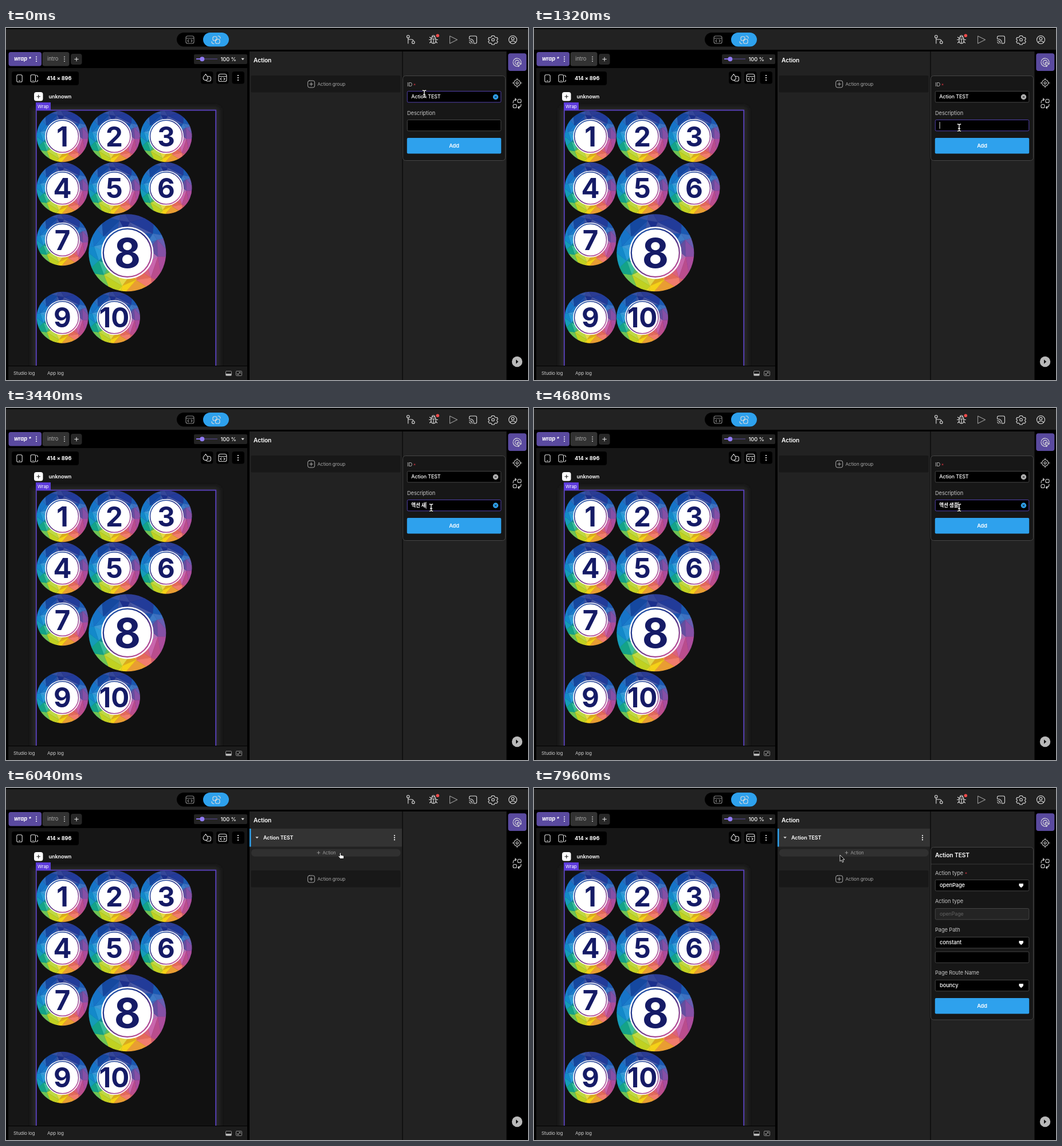
These frames come from a looping animation (911 px wide and 615 px high, 8 s). An HTML page:

```html
<!DOCTYPE html>
<html lang="en">
<head>
<meta charset="utf-8">
<title>Action editor</title>
<style>
html, body { margin: 0; width: 100%; height: 100%; overflow: hidden; background: #000; }
svg { display: block; width: 911px; height: 615px; }
text { font-family: Inter, "Noto Sans CJK KR", "Noto Sans CJK", sans-serif; letter-spacing: -.012em; white-space: pre; }
.i { fill: none; stroke: #ddd; stroke-width: 1.1; stroke-linecap: round; stroke-linejoin: round; }
</style>
</head>
<body>
<svg id="stage" viewBox="0 0 911 615"></svg>
<script>
const BLUE = '#2ea1ed', PURPLE = '#5140a8', EDGE = '#454545';

const text = (x, y, s, size = 9.3, fill = '#fff', weight = 400, more = '') =>
  `<text x="${x}" y="${y}" font-size="${size}" fill="${fill}" font-weight="${weight}" ${more}>${s}</text>`;
const rect = (x, y, w, h, fill, r = 0, more = '') =>
  `<rect x="${x}" y="${y}" width="${w}" height="${h}" rx="${r}" fill="${fill}" ${more}/>`;
const dot = (x, y, r, fill = '#fff', more = '') =>
  `<circle cx="${x}" cy="${y}" r="${r}" fill="${fill}" ${more}/>`;
const icon = (x, y, d, more = '') =>
  `<path class="i" transform="translate(${x} ${y})" d="${d}" ${more}/>`;
const ring = r => `M${-r} 0a${r} ${r} 0 1 0 ${2 * r} 0a${r} ${r} 0 1 0 ${-2 * r} 0`;
const box = (x, y, w, h, r = 2) =>
  `M${x + r} ${y}h${w - 2 * r}q${r} 0 ${r} ${r}v${h - 2 * r}q0 ${r} ${-r} ${r}h${2 * r - w}q${-r} 0 ${-r} ${-r}v${2 * r - h}q0 ${-r} ${r} ${-r}z`;
const kebab = (x, y, g = 4, r = 1.1) => [-g, 0, g].map(d => dot(x, y + d, r)).join('');
const field = (y, id = '', fill = '#000') =>
  rect(700.3, y + .5, 163.5, 19.3, fill, 2, `stroke="${EDGE}" id="${id}"`);
const label = (y, s) => text(700, y, s, 9.3, '#c4c4c4');
const star = (x, y) => text(x, y, '*', 8, '#d8343f');
const addButton = y => rect(699.8, y, 164.4, 27.4, BLUE, 2) +
  text(782, y + 16.7, 'Add', 9.2, '#fff', 600, 'text-anchor="middle"');
const clear = (y, id) => `<g id="${id}">${dot(854.5, y, 4.7, 'currentColor')}` +
  `<path d="M852.8 ${y - 1.7}l3.4 3.4m0 -3.4l-3.4 3.4" stroke="#111"/></g>`;
const select = (y, s) => field(y) + text(708, y + 13.2, s, 9.3, '#fff', 500) +
  `<path d="M846.5 ${y + 7}h7.4v3.2q-1 2.2 -3.7 4q-2.7 -1.8 -3.7 -4z" fill="#fff"/>`;

// Low-poly colour wheel, one stop every 30 degrees clockwise from the right
const WHEEL = ['8e4ba2', 'c4509f', 'f4735a', 'fdd418', 'b4d325', '16b08c',
               '1492d6', '1170c6', '1748a6', '1c2a86', '1b3192', '1b66be']
  .map(h => [0, 2, 4].map(i => parseInt(h.slice(i, i + 2), 16)));
let seed = 11;
const rnd = () => (seed = seed * 16807 % 2147483647) / 2147483647;

function facets() {
  const N = 12, radii = [25, 37, 53];
  const v = radii.map((r, k) => Array.from({ length: N }, (_, i) => {
    const a = (i + k / 2 + (rnd() - .5) * .7) / N * 2 * Math.PI, q = r + (k == 1 ? (rnd() - .5) * 9 : 0);
    return [q * Math.cos(a), q * Math.sin(a)];
  }));
  const tri = (...p) => {
    const cx = p[0][0] + p[1][0] + p[2][0], cy = p[0][1] + p[1][1] + p[2][1];
    const h = (Math.atan2(cy, cx) / Math.PI * 6 + 12) % 12, i = h | 0, f = h - i;
    const lift = (rnd() - .42) * (Math.hypot(cx, cy) < 108 ? .34 : .2);
    const c = WHEEL[i].map((a, k) => {
      const m = a + (WHEEL[(i + 1) % 12][k] - a) * f;
      return Math.round(lift > 0 ? m + (255 - m) * lift : m * (1 + lift));
    });
    return `<path d="M${p.map(q => q.map(n => n.toFixed(1))).join('L')}z" fill="rgb(${c})" stroke="rgb(${c})" stroke-width=".4"/>`;
  };
  let out = '';
  for (let k = 0; k < 2; k++)
    for (let i = 0; i < N; i++) {
      const j = (i + 1) % N;
      out += tri(v[k][i], v[k][j], v[k + 1][i]) + tri(v[k][j], v[k + 1][i], v[k + 1][j]);
    }
  return out;
}

const ball = (n, x, y, s = 1) => `<g transform="translate(${x} ${y}) scale(${s})"><use href="#ball"/>` +
  text(0, 17.2, n, 47.4, '#151b66', 700, 'text-anchor="middle" style="letter-spacing:0"') + '</g>';

const defs = `<defs>
  <clipPath id="disc">${dot(0, 0, 45)}</clipPath>
  <clipPath id="view">${rect(4, 70, 417, 520, '#000')}</clipPath>
  <filter id="soft" x="-20%" y="-20%" width="140%" height="140%"><feGaussianBlur stdDeviation="5"/></filter>
  <linearGradient id="rim" x2=".7" y2="1"><stop stop-color="#1c5fb4"/><stop offset=".45" stop-color="#232a80"/><stop offset="1" stop-color="#c04f98"/></linearGradient>
  <g id="ball"><g clip-path="url(#disc)">${facets()}</g>${dot(0, 0, 30.4)}${dot(0, 0, 28, 'none', 'stroke="url(#rim)" stroke-width="1.5"')}</g>
</defs>`;

const codeIcon = box(-7, -6.5, 14, 13, 3) + 'M-7 -2.5H7M-2 0l-2 2 2 2M2 0l2 2 -2 2';
const topBar = rect(0, 2, 911, 36, '#222') +
  rect(298, 8, 91, 24.5, '#000', 12.2) + rect(344, 8, 45, 24.5, BLUE, 12.2) +
  icon(321, 20.5, codeIcon, 'style="stroke:#888"') +
  icon(366.5, 20.5, box(-5.5, -5.5, 7, 7, 2.6) + box(-1, -1, 7.5, 7.5, 2.6) + 'M3.5 -6.5q4 0 4 4M-3.5 7q-4 0 -4 -4') +
  icon(706, 20, 'M-6.5 -5a2.3 2.3 0 1 0 4.6 0a2.3 2.3 0 1 0 -4.6 0M2.5 5a2.3 2.3 0 1 0 4.6 0a2.3 2.3 0 1 0 -4.6 0M-4.2 -2.7V7M-4.2 0H2q2.8 0 2.8 2.7') +
  icon(746, 20.5, 'M-4 -1.5q0 -3.5 4 -3.5t4 3.5v3.5q0 4.5 -4 4.5t-4 -4.5zM0 -1v7M-2.5 -5q0 -2.5 2.5 -2.5t2.5 2.5M-4 0h-3.5M4 0h3.5M-4 -2.5l-2.5 -2M-4 3l-2.5 2.5M4 3l2.5 2.5M-4 -1.5h8') +
  dot(753.3, 13.3, 2.8, '#ef4b4b') +
  icon(780.5, 20.5, 'M-6 -6.5L7 0L-6 6.5z', 'style="stroke:#999"') +
  icon(815, 20.5, 'M-6.5 -2v-2q0 -2.5 2.5 -2.5h8q2.5 0 2.5 2.5v8q0 2.5 -2.5 2.5h-2M-6.5 1.5q5 0 5 5M-6.5 -1.5q8 0 8 8M-6.5 4.5q2 0 2 2') +
  icon(850, 20.5, 'M-2 -7h4l.8 2 2.5 1.3 2 -.3v0l1 3 -1.4 1.2v2l1.4 1.3 -1.8 2.7 -2.2 -.4 -1.5 1 -.8 1.7h-4l-.8 -1.7 -1.6 -1 -2.1 .4 -1.8 -2.7 1.4 -1.3v-2l-1.4 -1.2 1 -3 2.2 .3 2.4 -1.3z' + ring(2.3)) +
  icon(884.5, 20.5, ring(7) + 'M-2.3 -2a2.3 2.3 0 1 0 4.6 0a2.3 2.3 0 1 0 -4.6 0M-4.8 4.8q1 -2.6 4.8 -2.6t4.8 2.6');

const tabs = rect(4.5, 42, 57.5, 24.5, '#5a4a9f', 4) + text(14, 57.4, 'wrap *', 9.4, '#fff', 700, 'font-style="italic"') +
  kebab(53, 54.3, 3.7, 1) +
  rect(63.5, 42, 47, 24.5, '#323232', 4) + text(72, 57.4, 'intro', 9.4, '#a9a9a9') +
  `<g opacity=".7">${kebab(102, 54.3, 3.7, 1)}</g>` +
  rect(113, 45, 19.5, 19, '#272727', 4) + icon(123, 54.5, 'M-3.3 0H3.3M0 -3.3V3.3') +
  rect(328, 46, 93, 17, '#232323', 2) + rect(332, 53.4, 37, 1.4, '#4c427d') + rect(332, 53.2, 10, 1.8, '#8b74f2') +
  dot(342.3, 54.2, 4, '#907af5') + text(374.5, 57.6, '100 %', 9.3, '#fff', 500) +
  '<path d="M410.5 52.8h5.4l-2.7 3.4z" fill="#ddd"/>';

const canvasTools = rect(10, 76, 117, 24, '#000', 4) +
  icon(23.5, 88, box(-4.7, -6.3, 9.4, 12.6, 2.4) + 'M-1 4h2') +
  icon(48, 88, box(-5, -6.3, 8.5, 12.6, 2.2) + 'M-1.5 4h1.5M5 -5.5q2.5 .5 2.5 3M5 6q2.5 -.5 2.5 -3') +
  text(71, 91.2, '414 × 896', 9.15, '#fff', 700) +
  [340, 367, 394.5].map(x => rect(x, 76, 21.5, 21.5, '#000', 4)).join('') +
  icon(350.5, 87, 'M-2 -6.5l3 4.5a4 4 0 1 1 -6.5 0zM1.5 -2.5h2.5q3 0 3 3v2.5q0 3 -3 3h-2.5q-2.5 0 -3 -2.5') +
  icon(378, 87, codeIcon) + kebab(405, 87);

const phone = `<g clip-path="url(#view)">` +
  rect(47, 139, 325, 480, '#292929', 4, 'filter="url(#soft)"') +
  rect(52.8, 143.6, 313.4, 480, '#111', 0, 'stroke="#5b42bf" stroke-width="1.8"') + '</g>' +
  rect(52, 130, 26, 13.5, '#5d3bdb') + text(55, 139.6, 'Wrap', 8) +
  rect(49, 112, 15.5, 15.5, '#fff', 4) + icon(56.7, 119.8, 'M-2.8 0H2.8M0 -2.8V2.8', 'style="stroke:#222"') +
  text(74.5, 123, 'unknown', 9.1, '#fff', 600) +
  [1, 2, 3, 4, 5, 6].map((n, i) => ball(n, 98.5 + i % 3 * 90.5, 189.3 + (i / 3 | 0) * 90.5)).join('') +
  ball(7, 98.5, 370.3) + ball(8, 211.8, 392.8, 1.5) + ball(9, 98.5, 505.8) + ball(10, 189, 505.8);

const footer = rect(4, 591, 417, 24, '#1c1c1c') + text(13, 606.3, 'Studio log', 8.1, '#ccc') + text(72, 606.3, 'App log', 8.1, '#ccc') +
  icon(388.5, 603.5, box(-5, -4, 10, 8, 1), 'style="stroke:#999;stroke-width:.9"') + rect(384, 604, 9, 3, '#bbb') +
  icon(406.5, 603.5, box(-5, -4, 10, 8, 1) + 'M-2.5 2L2.5 -2M.5 -2h2v2M-2.5 0v2h2', 'style="stroke:#999;stroke-width:.9"');

const side = rect(876.3, 44.3, 32, 30.7, '#5a4a9f', 4) +
  icon(892, 60, 'M2 6.6A7 7 0 1 1 6.6 2M0 3.6A3.6 3.6 0 1 1 3.6 0M0 0l7.5 2.6 -3.2 1.6 -1.6 3.3z') +
  icon(892, 96, ring(5.5) + ring(2) + 'M0 -8v2.5M0 8v-2.5M-8 0h2.5M8 0h-2.5') +
  icon(892, 132, box(1, -7.5, 6, 6, 2) + box(-7, 1.5, 6, 6, 2) + 'M-7 -1q0 -6 5.5 -6M-3.5 -9l2 2 -2 2M7 1q0 6 -5.5 6M3.5 9l-2 -2 2 -2') +
  dot(892, 583, 9.2, '#b9b9b9') + '<path d="M890 579.3v7.4l4.2 -3.7z" fill="#111"/>';

const middle = rect(425, 41, 266.5, 574, '#222') + rect(692.5, 41, 181, 574, '#222') +
  text(432, 59.5, 'Action', 10.2, '#fff', 600) +
  `<g id="head">${rect(425, 71, 266, 31.5, '#333')}${rect(425, 71, 2.5, 31.5, BLUE)}
    <path d="M435.3 85.2h5.6l-2.8 3z" fill="#ddd"/>${text(449, 89.8, 'Action TEST', 9, '#fff', 600)}${kebab(678, 86.7, 3.7, 1.1)}
    ${rect(428, 106.8, 260.5, 13, '#303030', 6)}${icon(545.5, 113, 'M-2.4 0H2.4M0 -2.4V2.4', 'style="stroke:#999;stroke-width:.9"')}${text(552.5, 116, 'Action', 7.8, '#999')}</g>` +
  `<g id="group">${rect(427.5, 83, 261, 29.5, '#181818', 2)}${icon(532.7, 98, box(-6, -6, 12, 12, 3) + 'M-2.8 0H2.8M0 -2.8V2.8', 'style="stroke:#bbb;stroke-width:.9"')}${text(543.5, 101.2, 'Action group', 8.2, '#a6a6a6')}</g>`;

const panel = (y, h) => rect(692.5, y + .5, 179, h, '#171717', 5, `stroke="${EDGE}"`);
const newGroup = `<g id="newGroup">${panel(83, 148)}${label(101.6, 'ID')}${star(711, 103)}
  ${field(110, 'idBox')}${text(707.3, 123, 'Action TEST', 8.9, '#fff', 500)}${clear(120.5, 'idClear')}
  ${label(151.5, 'Description')}${field(160, 'descBox')}${text(707.3, 172.7, '', 8.6, '#fff', 700, 'id="desc"')}
  ${rect(0, 164, 1, 12, '#ddd', 0, 'id="caret"')}${clear(170.3, 'descClear')}${addButton(192)}</g>`;
const newAction = `<g id="newAction">${panel(103, 301.5)}${text(700, 121.3, 'Action TEST', 10.3, '#fff', 600)}
  ${rect(693, 132.5, 178, 1, '#3a3a3a')}${label(151.5, 'Action type')}${star(752, 153)}${select(160, 'openPage')}
  ${label(201.3, 'Action type')}${field(210, '', '#242424')}${text(708, 222.6, 'openPage', 8.9, '#626262')}
  ${label(251, 'Page Path')}${select(260, 'constant')}${field(285.5)}
  ${label(326.3, 'Page Route Name')}${select(335, 'bouncy')}${addButton(367)}</g>`;

const beamPath = 'M-3.2 -6q3.2 0 3.2 1.8q0 -1.8 3.2 -1.8M0 -4.2V4.4M-3.2 6.2q3.2 0 3.2 -1.8q0 1.8 3.2 1.8M-2 1.5h4';
const cursors = `<g id="cursor">
  <g id="beam" fill="none"><path d="${beamPath}" stroke="#000" stroke-width="2.8"/><path d="${beamPath}" stroke="#fff" stroke-width="1.3"/></g>
  <path id="arrow" d="M0 0V11.2L2.6 8.8 4.3 12.8 6.2 12 4.5 8.1H8z" fill="#000" stroke="#eee" stroke-width=".9"/>
  <path id="hand" d="M-1.2 1.2q0 -1.2 1.1 -1.2t1.1 1.2v3l4 .9q1.4 .4 1.3 1.8l-.5 3.6h-6l-3.4 -4.2q-.3 -1.3 1 -1.1l1.4 1z" fill="#fff" stroke="#111" stroke-width=".9"/>
</g>`;

stage.innerHTML = defs + topBar + rect(4, 70, 417, 520, '#161616') + tabs + phone + canvasTools + footer +
  middle + side + newGroup + newAction + cursors;

const $ = id => document.getElementById(id);
const show = (id, on) => $(id).style.display = on ? '' : 'none';
const mix = (k, a, b) => `color-mix(in srgb, ${b} ${Math.round(k * 100)}%, ${a})`;
const ramp = (t, from, ms) => Math.max(0, Math.min(1, (t - from) / ms));

// Cursor path: time, x, y
const PATH = [[0, 730, 115], [80, 730, 115], [240, 738, 150], [400, 742, 174], [5000, 742, 174], [5100, 746, 186],
  [5240, 757, 200], [5320, 760.3, 204.5], [5560, 760.3, 204.5], [5680, 720, 180], [5800, 650, 140], [5960, 588, 114],
  [6040, 583.5, 113], [7000, 583.5, 113], [7120, 568, 124], [7240, 537, 120], [7320, 525, 105.5], [7440, 532, 90],
  [7560, 552, 87], [7680, 569, 98], [7800, 567, 126], [7840, 558, 129], [7880, 549, 126], [7920, 540, 121], [7960, 534, 117], [8000, 534, 117]];
function cursorAt(t) {
  const i = Math.max(1, PATH.findIndex(p => p[0] > t)), a = PATH[i - 1], b = PATH[i];
  const k = (t - a[0]) / (b[0] - a[0]);
  return [a[1] + (b[1] - a[1]) * k, a[2] + (b[2] - a[2]) * k];
}

// Syllables are composed key by key
const TYPED = [[420, ''], [1720, 'ㅇ'], [1840, '애'], [1960, '액'], [2080, '액ㅅ'], [2240, '액셔'], [2380, '액션'],
  [3200, '액션 '], [3320, '액션 ㅅ'], [3400, '액션 새'], [3480, '액션 샘'], [3560, '액션 샘ㅍ'], [3640, '액션 샘프'], [3740, '액션 샘플']];

function draw(t) {
  const opened = t >= 5640, picked = t >= 6200;
  show('newGroup', !opened);
  show('head', opened);
  show('newAction', picked);
  $('group').setAttribute('transform', `translate(0 ${opened ? 61 : 0})`);

  const idFocus = 1 - ramp(t, 420, 160), descFocus = ramp(t, 420, 160) * (1 - ramp(t, 5340, 140));
  $('idBox').style.stroke = mix(idFocus, EDGE, PURPLE);
  $('descBox').style.stroke = mix(descFocus, EDGE, PURPLE);
  $('idClear').style.color = t < 420 ? BLUE : '#b4b4b4';
  $('descClear').style.color = t < 5340 ? BLUE : '#b4b4b4';

  const key = TYPED.filter(k => k[0] <= t).pop(), typed = key ? key[1] : '';
  if ($('desc').textContent !== typed) $('desc').textContent = typed;
  show('descClear', typed);
  show('caret', key && t < 5340 && Math.floor((t - key[0]) / 450) % 2 == 0);
  $('caret').setAttribute('x', typed ? 707.3 + $('desc').getComputedTextLength() : 707.6);

  const [x, y] = cursorAt(t);
  $('cursor').setAttribute('transform', `translate(${x} ${y})`);
  const hand = t >= 5940 && !picked, beam = t < 5060;
  show('beam', beam);
  show('hand', hand);
  show('arrow', !beam && !hand);
}

(function tick() {
  draw(performance.now() % 8000);
  requestAnimationFrame(tick);
})();
</script>
</body>
</html>
```
